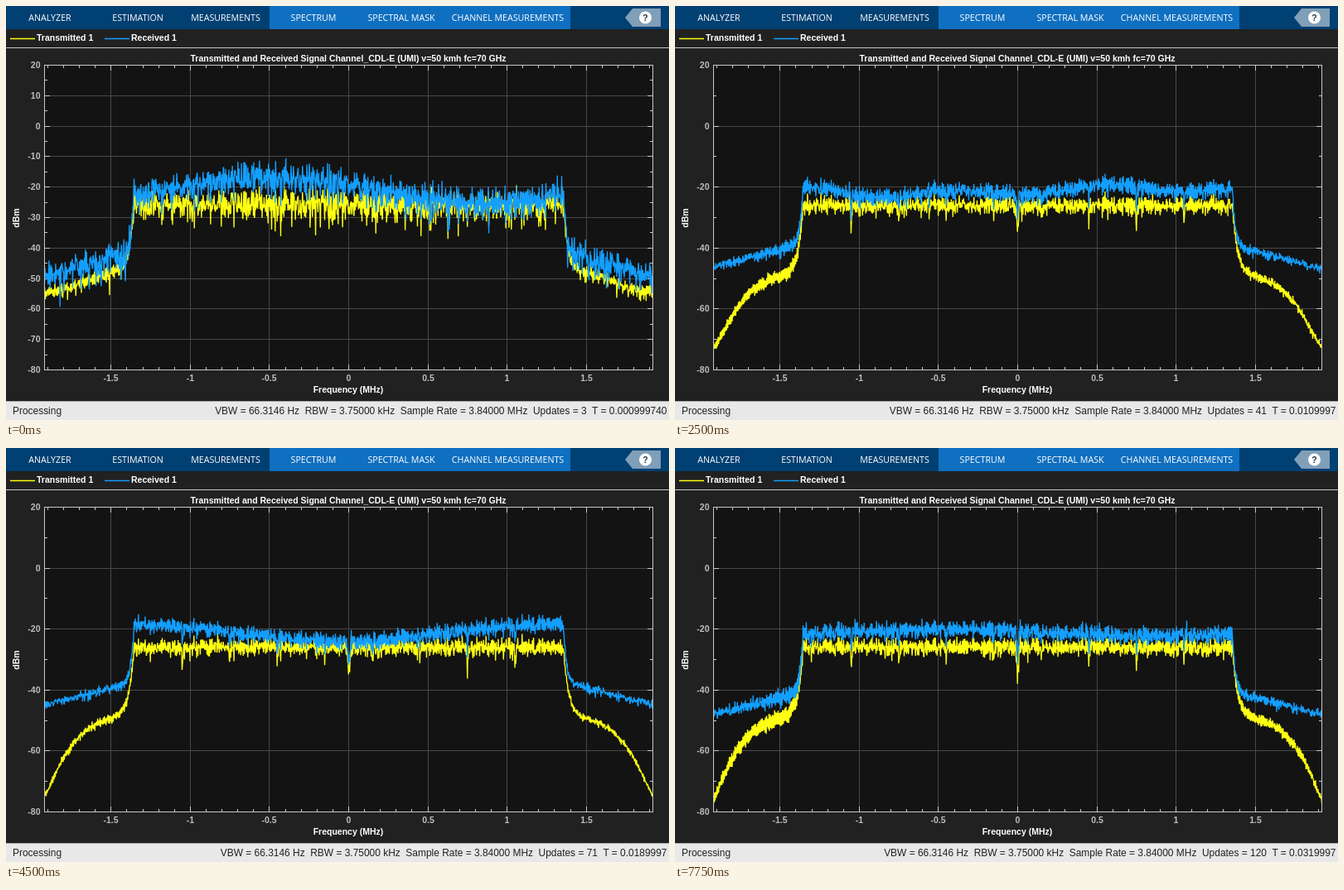
An HTML page that plays this animation: 800x500 px, repeating every 8000 ms.

```html
<!DOCTYPE html>
<html lang="en">
<head>
<meta charset="utf-8">
<title>Spectrum analyzer</title>
<style>
  html, body { margin: 0; width: 100%; height: 100%; overflow: hidden; background: #212121; }
  svg { display: block; }
  text { white-space: pre; }
  .tab { font: 500 10.67px "Open Sans", sans-serif; fill: #fff; }
  .label { font: bold 10.5px "Liberation Sans", Arial, sans-serif; fill: #fff; }
  .tick { fill: #bebebe; }
  .status { font: 11.95px "Liberation Sans", Arial, sans-serif; fill: #222; }
  .mid { text-anchor: middle; }
  .end { text-anchor: end; }
  .grid { stroke: #484848; }
  .axis { stroke: #c8c8c8; fill: none; }
  .grid, .axis { shape-rendering: crispEdges; }
  .trace { fill: none; stroke-width: 1.35; stroke-linejoin: bevel; }
</style>
</head>
<body>
<svg id="stage" width="800" height="500" viewBox="0 0 800 500">
  <rect width="800" height="500" fill="#212121"/>
  <rect width="800" height="28" fill="#004072"/>
  <rect x="318" width="363" height="28" fill="#0f6fc0"/>
  <path d="M747 14L756 3H790V25H756Z" fill="#809fb8"/>
  <circle cx="771.5" cy="14" r="7.5" fill="#fff"/>
  <text class="label mid" x="771.5" y="18" style="fill: #263440">?</text>
  <path class="axis" d="M0 50.5H800"/>
  <path d="M5 39.5H35" stroke="#ffff11" stroke-width="1.5"/>
  <path d="M119 39.5H149" stroke="#139fff" stroke-width="1.5"/>
  <rect x="46" y="71" width="735" height="369" fill="#131313"/>
  <g id="xAxis"></g>
  <g id="coarse"></g>
  <g id="fine"></g>
  <path id="sent" class="trace" stroke="#ffff11"/>
  <path id="received" class="trace" stroke="#139fff"/>
  <rect class="axis" x="46.5" y="71.5" width="734" height="368"/>
  <rect y="477" width="800" height="23" fill="#e8e8e8"/>
  <path d="M0 477.5H800" stroke="#a8a8a8"/>
  <text class="status" x="8" y="493">Processing</text>
  <text class="status end" id="status" x="797.5" y="493"></text>
</svg>
<script>
const STEP_MS = 250, STEPS = 32;
const BINS = 1536, SPAN = 3.84, BAND_EDGE = 1.355, WINDOW = 16;
const PX_PER_MHZ = 734 / SPAN, TAIL = 109;
const { PI, abs, cos, exp, floor, log, log10, max, min, round } = Math;
const byId = id => document.getElementById(id);
const xOf = mhz => 413.5 + mhz * PX_PER_MHZ;
const yOf = db => 71.5 + (20 - db) * 3.68;

function add(parent, tag, attrs, text) {
  const el = document.createElementNS('http://www.w3.org/2000/svg', tag);
  for (const key in attrs) el.setAttribute(key, attrs[key]);
  if (text !== undefined) el.textContent = text;
  parent.append(el);
  return el;
}

// Fixed labels
const stage = byId('stage');
const label = (cls, x, y, text) => add(stage, 'text', { class: cls, x, y }, text);
['ANALYZER', 'ESTIMATION', 'MEASUREMENTS', 'SPECTRUM', 'SPECTRAL MASK']
  .forEach((text, i) => label('tab mid', 53 + 106 * i, 18, text));
label('tab mid', 605.5, 18, 'CHANNEL MEASUREMENTS');
label('label', 37, 42, 'Transmitted 1');
label('label', 151, 42, 'Received 1');
label('label mid', 413, 67, 'Transmitted and Received Signal Channel_CDL-E (UMI) v=50 kmh fc=70 GHz');
label('label mid', 413, 467, 'Frequency (MHz)');
label('label mid', 0, 0, 'dBm').setAttribute('transform', 'translate(16 256) rotate(-90)');

// Axes
const snap = v => floor(v) + 0.5;
function vTick(x, len) {
  add(byId('xAxis'), 'path', { class: 'axis', d: `M${x} 439v${-len}M${x} 72v${len}` });
}
function hTick(group, y, len) {
  add(group, 'path', { class: 'axis', d: `M47 ${y}h${len}M780 ${y}h${-len}` });
}
for (let n = -19; n <= 19; n++) {
  const x = snap(xOf(n / 10));
  if (n % 5) { vTick(x, 3); continue; }
  add(byId('xAxis'), 'path', { class: 'grid', d: `M${x} 72V439` });
  vTick(x, 6);
  add(byId('xAxis'), 'text', { class: 'label tick mid', x, y: 453 }, n / 10);
}
function buildYAxis(group, gap) {
  for (let db = -80; db <= 20; db += gap) {
    const y = snap(yOf(db));
    add(group, 'path', { class: 'grid', d: `M47 ${y}H780` });
    hTick(group, y, 6);
    if (db < 20) hTick(group, snap(yOf(db + gap / 2)), 3);
    add(group, 'text', { class: 'label tick end', x: 41.5, y: y + 3.5 }, db);
  }
}
buildYAxis(byId('coarse'), 20);
buildYAxis(byId('fine'), 10);

// Mean levels in dBm; d is the distance in pixels outside the band
const sentLevel = d => -26 - 22 * (1 - exp(-d / 6)) - 5 * d / TAIL - 25 * (d / TAIL) ** 3.5;
const receivedDrop = d => 19 * (1 - exp(-d / 3.5)) + 7.5 * d / TAIL;

// Frequency-selective fading: a drifting echo and a short-lived finer ripple
const bump = (v, center, width) => exp(-(((v - center) / width) ** 2));
function fading(step, mhz) {
  const peak = 0.43 - 0.93 * cos(2 * PI * step / STEPS);
  const depth = 1 + 3 * exp(-step / 3) + 1.9 * bump(step, 19, 3.5);
  return -21.2 + depth * cos(2 * PI * (mhz - peak) / 2.7)
    + 1.2 * bump(step, 9, 4) * cos(2 * PI * (mhz + 0.4) / 0.95);
}

// Narrow gaps at DC and at odd multiples of 0.15 MHz
function gapDepth(mhz) {
  const shape = (at, bins) => max(0, 1 - abs(mhz - at) * BINS / SPAN / bins);
  const at = 0.15 * (2 * round((mhz / 0.15 - 1) / 2) + 1);
  const depth = 4 + 3.5 * max(0, cos(2 * PI * (at - 0.75) / 1.8));
  return 9 * shape(0, 4.5) + (abs(at) < 1.2 ? depth * shape(at, 2.5) : 0);
}

function random(a, b) {
  let h = Math.imul(a + 1, 0x9E3779B1) ^ Math.imul(b + 1, 0x85EBCA6B);
  h = Math.imul(h ^ h >>> 15, 0x2C1B3C6D);
  h = Math.imul(h ^ h >>> 12, 0x297A2D39);
  return ((h ^ h >>> 15) >>> 0) / 2 ** 32 + 1e-9;
}
// Log of averaged noise power; the window slides over the latest updates
function noise(seed, updates, bin) {
  const count = min(updates, WINDOW);
  let sum = 0;
  for (let k = 0; k < count; k++) sum -= log(random(seed + updates - k, bin));
  return 10 * log10(sum / count) + 2.17 / count;
}

function drawTraces(step, updates) {
  const leak = 10 ** (-5.45 - 1.9 * log10(step + 1));
  const gapScale = min(1, 0.6 + step / 15);
  const tailNoise = 0.6 + 0.4 / (step + 1);
  const ripple = 1.9 + 1.1 * cos(2 * PI * (step - 12) / 9.5);
  const sent = [], received = [];
  for (let i = 0; i < BINS; i++) {
    const mhz = SPAN * (i / (BINS - 1) - 0.5), x = xOf(mhz).toFixed(2);
    const d = max(0, abs(mhz) - BAND_EDGE) * PX_PER_MHZ;
    const a = noise(0, updates, i), b = noise(1000, updates, i);
    const comb = cos(i * 2.2);
    let s = 10 * log10(10 ** (sentLevel(d) / 10) + leak);
    let r = fading(step, mhz * min(1, BAND_EDGE / abs(mhz))) - receivedDrop(d);
    if (d === 0) {
      const gap = gapScale * gapDepth(mhz);
      s += a + 1.7 * comb - gap;
      r += 0.8 * a + 0.5 * b + 1.7 * comb - 0.9 * gap;
    } else {
      const near = 1 - d / TAIL;
      const wave = comb * (mhz < 0 ? ripple : 0.3 + 0.5 * ripple);
      s += 0.4 * a + wave * (0.6 + 0.4 * near);
      r += tailNoise * b + wave * (0.2 + 0.7 * near);
    }
    sent.push(x + ' ' + yOf(s).toFixed(2));
    received.push(x + ' ' + yOf(r).toFixed(2));
  }
  byId('sent').setAttribute('d', 'M' + sent.join('L'));
  byId('received').setAttribute('d', 'M' + received.join('L'));
}

function show(step) {
  const updates = floor((step + 1) * 3.75);
  const time = ((step + 1) * 1e-3 - 2.6e-7).toPrecision(6);
  byId('fine').style.display = step ? 'none' : '';
  byId('coarse').style.display = step ? '' : 'none';
  byId('status').textContent = 'VBW = 66.3146 Hz  RBW = 3.75000 kHz  Sample Rate = 3.84000 MHz'
    + `  Updates = ${updates}  T = ${time}`;
  drawTraces(step, updates);
}

let shown = -1;
const start = performance.now();
function tick() {
  const step = floor((performance.now() - start) / STEP_MS) % STEPS;
  if (step !== shown) show(shown = step);
  requestAnimationFrame(tick);
}
tick();
</script>
</body>
</html>
```
